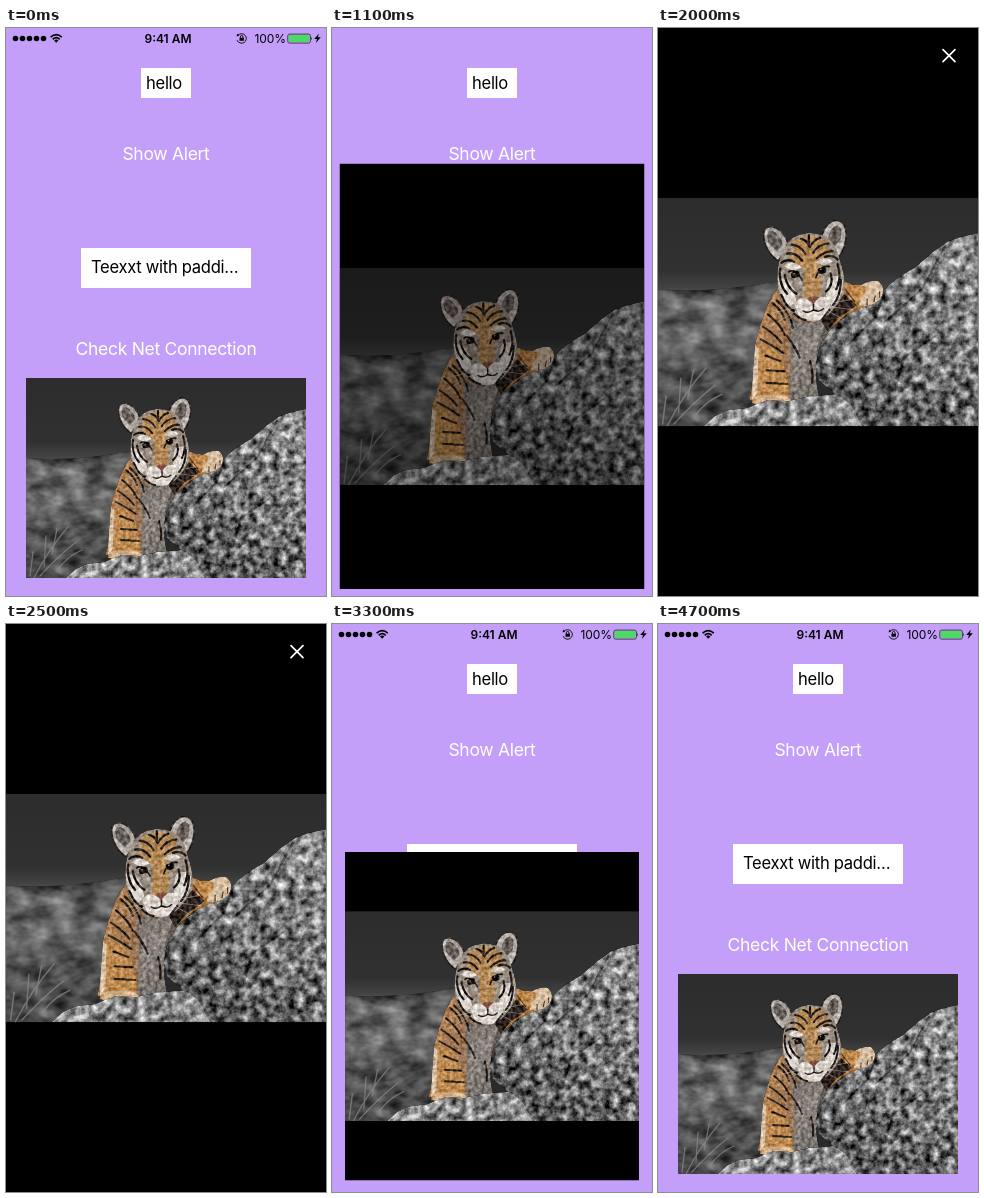
An HTML page that plays this animation: 320 px wide and 568 px high, repeating every 4.8 s.

```html
<!DOCTYPE html>
<html lang="en">
<head>
<meta charset="utf-8">
<title>Image zoom</title>
<style>
  html, body { margin: 0; width: 100%; height: 100%; overflow: hidden; background: #c39ffa; }
  #stage { display: block; width: 320px; height: 568px; }
  text { font-family: Inter, Roboto, sans-serif; white-space: pre; }
  .label { font-size: 16.6px; letter-spacing: -.3px; }
  .button { font-size: 17.5px; letter-spacing: -.3px; fill: #fff; text-anchor: middle; }
  .line { fill: none; stroke-linecap: round; stroke-linejoin: round; }
</style>
</head>
<body>
<svg id="stage" viewBox="0 0 320 568">
  <defs>
    <linearGradient id="field" x2="0" y2="1">
      <stop offset="0" stop-color="#2c2c2c"/><stop offset=".32" stop-color="#313131"/>
      <stop offset=".39" stop-color="#424242"/><stop offset=".46" stop-color="#656565"/>
      <stop offset=".64" stop-color="#626262"/><stop offset=".8" stop-color="#4c4c4c"/>
      <stop offset="1" stop-color="#444"/>
    </linearGradient>
    <linearGradient id="stone" x1=".7" x2=".3" y2="1">
      <stop offset="0" stop-color="#888"/><stop offset=".55" stop-color="#757575"/>
      <stop offset="1" stop-color="#515151"/>
    </linearGradient>
    <linearGradient id="coat" x2="1" y2=".2">
      <stop offset="0" stop-color="#c08c55"/><stop offset=".45" stop-color="#9b7453"/>
      <stop offset=".75" stop-color="#6f655e"/><stop offset="1" stop-color="#443c36"/>
    </linearGradient>
    <linearGradient id="chest" x2=".4" y2="1">
      <stop offset="0" stop-color="#6d6661"/><stop offset=".5" stop-color="#8e8781"/>
      <stop offset="1" stop-color="#76706b"/>
    </linearGradient>
    <clipPath id="frame"><rect width="280" height="200"/></clipPath>
    <g id="filters"></g>
  </defs>

  <rect width="320" height="568" fill="#c39ffa"/>
  <path fill="#fff" d="M135 40h50v30h-50zM75 220h170v40H75z"/>
  <text class="label" x="140" y="61.3">hello</text>
  <text class="button" x="160" y="132">Show Alert</text>
  <text class="label" x="85" y="245">Teexxt with paddi…</text>
  <text class="button" x="160" y="327">Check Net Connection</text>

  <g id="status">
    <path class="line" stroke="#000" stroke-width="5.6" d="M9.5 10.5h0M16.5 10.5h0M23.5 10.5h0M30.5 10.5h0M37.5 10.5h0"/>
    <path class="line" stroke="#000" stroke-width="1.7" style="stroke-linecap:butt" d="M44.6 9.2Q50.2 4 55.8 9.2M46.7 11.3Q50.2 8 53.7 11.3"/>
    <path d="M48 12.4Q50.2 10.6 52.4 12.4L50.2 14.8Z"/>
    <text x="162" y="14.6" text-anchor="middle" font-size="12" font-weight="600">9:41 AM</text>
    <path class="line" stroke="#000" stroke-width=".9" d="M232.2 7A4.8 4.8 0 1 1 231.2 12.5M234.4 10V8.8a1.3 1.3 0 0 1 2.6 0V10"/>
    <path d="M233.5 9.8h4.4v3h-4.4zM230.4 8.2l2.8-.2-1.6-2.4z"/>
    <text x="248.6" y="14.6" font-size="12" letter-spacing="-.1">100%</text>
    <rect x="281.8" y="6.1" width="22.6" height="9" rx="1.8" fill="none" stroke="#222" stroke-width=".8"/>
    <rect x="282.8" y="7.1" width="20.6" height="7" rx="1" fill="#4cd964"/>
    <path d="M305.3 9q1.5 1.6 0 3.2zM313 5.5l-4.8 5.6h2.8l-1.2 4 5-5.8h-2.9z"/>
  </g>

  <rect id="back"/>
  <svg id="photo" viewBox="0 0 280 200">
    <g clip-path="url(#frame)">
      <rect width="280" height="200" fill="url(#field)"/>
      <path fill="url(#field)" filter="url(#turf)" d="M0 0M0 80Q50 84 110 72V200H0Z"/>
      <path class="line" stroke="#909090" stroke-opacity=".65" stroke-width="1.3" d="M8 200Q22 172 42 149M14 198Q30 180 50 164M18 188L20 158M26 176L31 151M4 198L7 174M33 190Q42 178 56 172"/>
      <path fill="#2a2a2a" d="M134 120H152L186 200H120Z"/>

      <g filter="url(#fur)">
        <!-- body and legs -->
        <path fill="url(#coat)" d="M106 78C94 92 90 110 85 128L83 160 80 177 96 181 117 178 137 176 140 138 150 117 166 104 164 74Z"/>
        <path fill="url(#chest)" d="M114 104Q130 114 147 106L139 131 138 158 141 176H115L117 150Z"/>
        <path fill="#bd8a51" d="M89 130Q99 126 109 142L115 166 112 180H82L83 155Z"/>
        <path fill="#d3bda5" d="M85 130L88 132 87 170 82 178 83 152Z"/>
        <path class="line" stroke="#2a211b" stroke-width="1.9" d="M100 92Q108 98 111 107M96 102Q106 109 111 120M92 113Q102 119 108 127M90 124Q98 128 110 136M94 138L107 143M95 151L111 152M95 162L113 163M104 90Q116 101 118 114M113 121Q121 132 124 140M133 143Q136 153 135 162"/>
        <path fill="#d0ae88" d="M83 178Q85 171 97 173 112 170 117 178L113 182H86Z"/>
      </g>

      <g filter="url(#rock)">
        <path fill="url(#stone)" d="M280 31L266 34 254 38 240 48 225 61 210 70 197 81 180 92 163 105 149 117 141 131 138 147 141 160 154 171 166 179 179 200H280Z"/>
        <path class="line" stroke="#303030" stroke-opacity=".6" stroke-width="2" d="M143 145L164 151 181 172 190 200M199 82L190 105 166 129M251 43L231 80 198 109M207 171L215 140 244 120"/>
        <path fill="#8c8c8c" d="M40 200L50 191 61 186 78 184 96 177 114 178 131 174 156 172 168 180 179 200Z"/>
      </g>

      <g filter="url(#fur)">
        <!-- reaching arm -->
        <path fill="#a8743f" d="M155 79Q162 69 172 78L188 75Q196 75 197 82 194 93 179 96L164 103 151 114Z"/>
        <path fill="#2f2520" d="M143 108L163 84 174 94 157 106 148 117Z"/>
        <path fill="#d6bfa3" d="M173 80Q183 71 193 73 200 79 195 88 187 97 176 94Z"/>
        <path fill="#c08a4e" d="M166 77Q176 74 183 79L176 92 167 88Z"/>
        <path class="line" stroke="#4a3322" stroke-width="1.1" d="M163 79L172 91M189 91L190 86M183 94L183 89M194 87L194 82"/>

        <!-- ears -->
        <g fill="#b3aba5" stroke="#322b27" stroke-width="1.4">
          <path d="M105 55C96 49 91 38 93 29 96 23 104 25 109 31 113 36 115 42 113 47Z"/>
          <path d="M143 40C142 31 147 22 155 20 163 19 166 28 164 38 163 45 160 50 157 52Z"/>
        </g>
        <path fill="#665e59" d="M97 40Q93 29 100 29 107 32 109 41L104 47ZM149 36Q150 26 157 24 162 26 160 36L155 43Z"/>

        <!-- head -->
        <path fill="#988b7f" d="M107 52C110 40 118 32 130 31 144 30 153 36 157 48 160 58 165 70 163 82 158 94 150 104 138 109 124 109 112 100 107 88 103 76 104 62 107 52Z"/>
        <path fill="#b38857" d="M119 38Q134 29 148 38L150 52 141 60 143 82 136 91 128 88 128 63 115 54Z"/>
        <path fill="#d9d3cc" d="M110 60Q117 53 126 61L118 64ZM138 57Q145 49 153 56L145 59ZM105 70Q113 70 118 78L121 90 114 97Q106 86 105 70ZM148 72Q156 65 162 72 162 87 153 96L147 86ZM119 93Q126 83 135 93 142 83 151 89 151 99 144 106 136 109 125 107Z"/>
        <path class="line" stroke="#1f1a18" stroke-width="2" d="M132 33L132 42M125 36Q130 37 132 42M142 35Q136 37 133 43M117 41Q125 42 129 49M149 40Q140 41 136 48M113 49Q120 47 126 55M153 47Q146 46 139 53M108 57Q113 53 119 56M157 54Q152 49 146 52M107 62Q105 75 113 84M111 68Q113 79 121 84M108 85Q112 96 119 99M157 58Q161 70 156 80M160 72Q160 86 153 94M151 66Q154 76 147 82M119 101Q123 106 129 107M150 98L144 106"/>
        <path class="line" stroke="#171412" stroke-width="5.5" d="M119 67.5l2.5-.5M142.5 64l2-.5"/>
        <path class="line" stroke="#171412" stroke-width="1.5" d="M114 65Q120 61 126 72M150 60Q142 59 138 70"/>
        <path class="line" stroke="#c2a47c" stroke-width="1" d="M119 66.3h.3M142.4 62.7h.3"/>
        <path fill="#7d4a3b" d="M130 88Q135 85 141 87L136 93Z"/>
        <path class="line" stroke="#281d19" stroke-width="1.3" d="M136 93V98M127 99Q132 102 136 98 141 101 145 97"/>
      </g>
      <path class="line" stroke="#f0ebe5" stroke-opacity=".6" stroke-width=".6" d="M122 96L99 101M123 98L104 109M148 93L169 89M148 95L170 98M147 98L163 107"/>
    </g>
  </svg>
  <path id="close" class="line" stroke="#fff" stroke-width="1.7" d="M285 21.7l12 12M297 21.7l-12 12"/>
</svg>
<script>
const $ = id => document.getElementById(id);

// Adds grey noise to a shape, keeping its outline.
const noise = (id, frequency, octaves, strength) => `
  <filter id="${id}" x="0" y="0" width="1" height="1" color-interpolation-filters="sRGB">
    <feTurbulence type="fractalNoise" baseFrequency="${frequency}" numOctaves="${octaves}" seed="4"/>
    <feColorMatrix values="1 0 0 0 0 1 0 0 0 0 1 0 0 0 0 0 0 0 0 1" result="grain"/>
    <feComposite in="SourceGraphic" in2="grain" operator="arithmetic" k2="1" k3="${strength}" k4="${-strength / 2}"/>
    <feComposite operator="in" in2="SourceGraphic"/>
  </filter>`;
$('filters').innerHTML =
  noise('rock', .13, 4, 1.3) + noise('turf', '.05 .08', 3, .6) + noise('fur', .3, 2, .55);

const ease = u => (1 - Math.cos(Math.PI * Math.min(1, Math.max(0, u)))) / 2;
const show = (id, on) => $(id).style.display = on ? '' : 'none';

let last;
function draw(now) {
  requestAnimationFrame(draw);
  const t = Math.floor(now % 4800 / 100) * 100;
  if (t === last) return;
  last = t;
  const open = ease((t - 937) / 285);
  const p = open - ease((t - 3126.6) / 290);
  const box = { x: 20 - 20 * p, y: 350 - 350 * p, width: 280 + 40 * p, height: 200 + 368 * p };
  for (const id of ['back', 'photo'])
    for (const key in box) $(id).setAttribute(key, box[key]);
  $('photo').style.opacity = t < 1000 ? 1 : Math.max(.5, open);
  show('back', p > 0);
  show('status', t < 1000 || t >= 3200);
  show('close', t >= 1700 && t < 3200);
  $('close').style.opacity = Math.min(1, (t - 1600) / 200);
}
draw(0);
</script>
</body>
</html>
```
